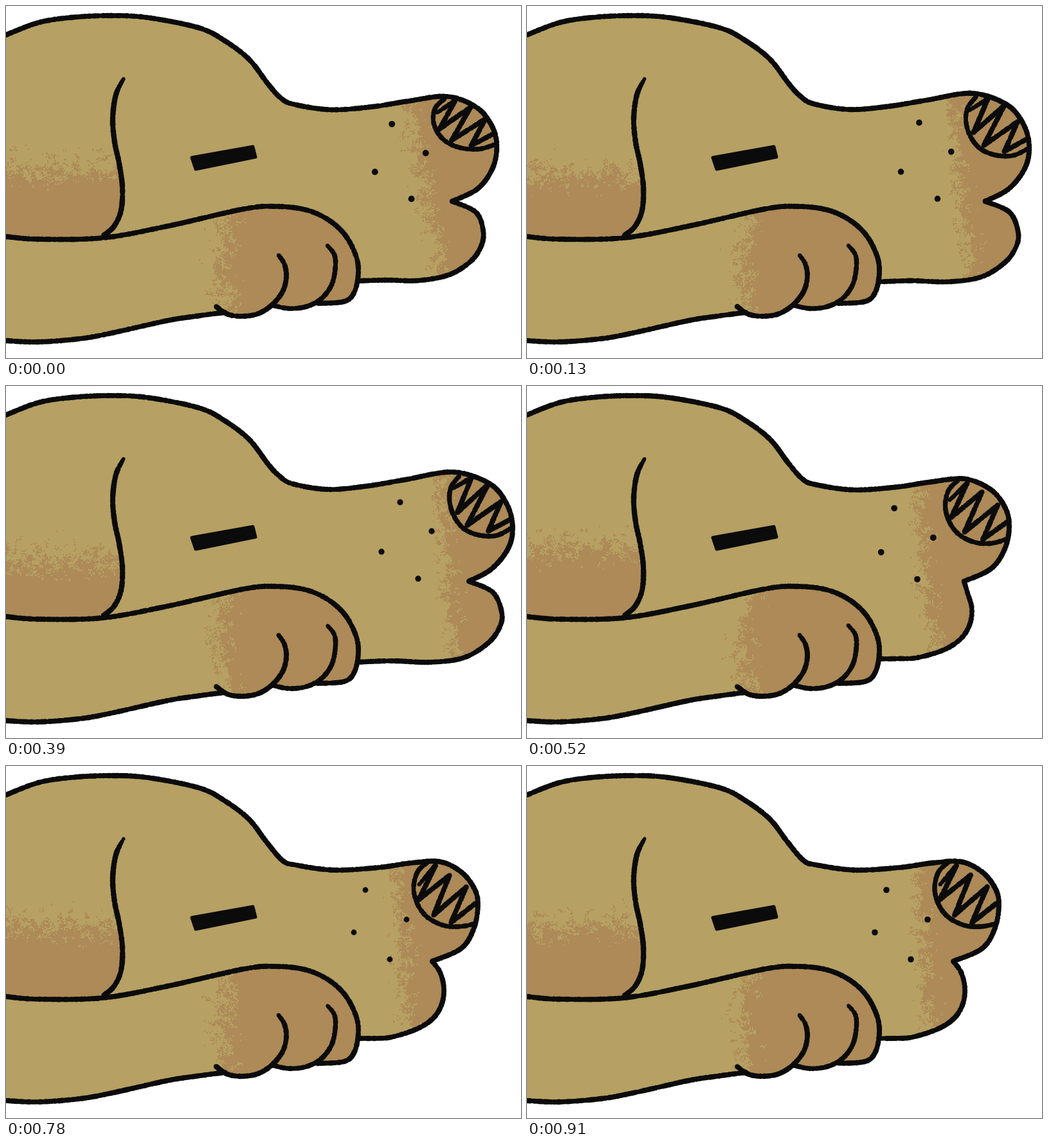
Write an HTML page with a canvas that moves like this. It is 801 by 548 pixels and loops after 1040 ms.

```html
<!DOCTYPE html>
<html lang="en">
<head>
<meta charset="utf-8">
<title>Sleeping dog</title>
<style>
html, body { margin: 0; width: 801px; height: 548px; overflow: hidden; background: #fff; }
canvas { display: block; }
</style>
</head>
<body>
<canvas id="stage" width="801" height="548"></canvas>
<script>
const W = 801, H = 548, STEP = 130;
const FUR = "#b6a063", SHADE = "#ad8a57", INK = "#0b0b0b";

// How far the muzzle is stretched out by each breath step, 0 to 1.
const BREATH = [0.68, 0.92, 1, 1, 0.12, 0, 0, 0];

// Key points that smooth curves run through.
const body = parse({
  back: "0,45 50,26 100,18 160,15 220,18 300,34 340,54 378,83",
  ear: "183,113 171,138 166,175 169,212 176,245 181,282 179,318 168,343 152,357",
  arm: "0,359 50,363 150,361 250,343 370,316 420,312 465,317 500,332 527,356 544,388 548,415 542,445 526,460 485,463",
  toe1: "424,388 433,402 436,422 430,445 413,466 392,479 368,483 345,480 327,468",
  toe2: "500,373 511,388 512,410 506,435 490,456 467,468 440,471 415,466",
  belly: "0,521 50,523 115,518 165,509 250,490 295,483 340,477",
  eye: "289,236 384,219 388,235 295,254"
});
const exhaled = parse({
  top: "405,118 430,147 450,154 510,162 580,158 630,151 675,149 708,165 728,190 734,215 728,252 708,284 663,304",
  jaw: "675,321 681,345 678,370 665,392 640,409 600,422 575,424 545,424",
  nose: "655,150 640,165 634,190 640,215 655,235 680,248 705,250 728,246",
  scribble: "642,185 668,155 642,208 690,170 665,232 716,188 692,244 730,214",
  dots: "559,193 623,239 541,259 597,301"
});
const inhaled = parse({
  top: "408,122 424,139 445,152 500,161 560,156 620,146 695,134 752,152 779,184 788,220 781,253 755,285 720,304",
  jaw: "757,321 771,352 768,375 750,400 712,423 660,430 600,428 545,430",
  nose: "705,140 692,158 690,180 697,203 712,222 735,232 762,233 785,222",
  scribble: "694,160 724,143 702,197 750,153 717,217 770,180 750,226 784,208",
  dots: "613,181 662,226 584,258 641,300"
});

function parse(shapes) {
  return Object.fromEntries(Object.entries(shapes).map(
    ([name, text]) => [name, text.split(" ").map(p => p.split(",").map(Number))]));
}

function stretch(name, t) {
  return exhaled[name].map((p, i) => p.map((v, j) => v + (inhaled[name][i][j] - v) * t));
}

// Catmull-Rom curve sampled about once per pixel.
function smooth(pts) {
  const out = [];
  for (let i = 0; i < pts.length - 1; i++) {
    const b = pts[i], c = pts[i + 1], a = pts[i - 1] || b, d = pts[i + 2] || c;
    const n = Math.ceil(Math.hypot(c[0] - b[0], c[1] - b[1]));
    for (let k = 0; k < n; k++) {
      const t = k / n;
      out.push([0, 1].map(j => b[j] + t / 2 * (c[j] - a[j]
        + t * (2 * a[j] - 5 * b[j] + 4 * c[j] - d[j] + t * (3 * (b[j] - c[j]) + d[j] - a[j])))));
    }
  }
  out.push(pts[pts.length - 1]);
  return out;
}

function hash(x, y, seed) {
  let h = Math.imul(x, 374761393) ^ Math.imul(y, 668265263) ^ Math.imul(seed + 1, 974634773);
  h = Math.imul(h ^ h >>> 13, 1274126177);
  h = Math.imul(h ^ h >>> 15, 2246822519);
  return ((h ^ h >>> 16) >>> 0) / 4294967296;
}

function grain(x, y, seed) {
  const i = Math.floor(x / 7), j = Math.floor(y / 7), u = x / 7 - i, v = y / 7 - j;
  const mix = row => hash(i, row, seed) * (1 - u) + hash(i + 1, row, seed) * u;
  return 0.6 * (mix(j) * (1 - v) + mix(j + 1) * v) + 0.4 * hash(x, y, seed + 50);
}

function polygon(pts) {
  const path = new Path2D();
  pts.forEach(p => path.lineTo(...p));
  path.closePath();
  return path;
}

function render(breath, step) {
  const canvas = document.createElement("canvas");
  canvas.width = W;
  canvas.height = H;
  const g = canvas.getContext("2d");

  const fill = (path, color) => {
    g.fillStyle = color;
    g.fill(path);
  };
  // depth: distance into the shadow, which thins out in grains over the given band
  const shade = (path, [x0, y0, x1, y1], band, depth) => {
    g.save();
    g.clip(path);
    g.fillStyle = SHADE;
    for (let y = y0; y < y1; y += 2) {
      for (let x = x0; x < x1; x += 2) {
        if (depth(x, y) / band / 2 + 0.5 > grain(x, y, step)) g.fillRect(x, y, 2, 2);
      }
    }
    g.restore();
  };
  // Rough pen line; taper is the relative width at its start.
  const ink = (pts, radius, taper = 1) => {
    g.fillStyle = INK;
    g.beginPath();
    pts.forEach(([x, y], i) => {
      const thin = taper + (1 - taper) * Math.min(1, i / 25);
      const r = radius * thin + (hash(i, radius * 10, step) - 0.5) * 0.9;
      g.moveTo(x + r, y);
      g.arc(x, y, r, 0, 7);
    });
    g.fill();
  };

  // The nose lags behind the jaw and is squeezed by a sudden breath in.
  const before = BREATH[(step + BREATH.length - 1) % BREATH.length];
  const lagged = breath + (before - breath) * 0.2;
  const squeeze = 1 - 0.4 * Math.max(0, breath - before) ** 2;
  const tip = name => stretch(name, lagged).map(([x, y]) => [x, 143 + (y - 143) * squeeze]);

  const top = [...body.back, ...stretch("top", lagged)];
  const topLine = smooth(top);
  const jawLine = smooth([top[top.length - 1], ...stretch("jaw", breath)]);
  const ear = smooth(body.ear), arm = smooth(body.arm), belly = smooth(body.belly);

  g.fillStyle = "#fff";
  g.fillRect(0, 0, W, H);

  const head = polygon([...topLine, ...jawLine, [0, 420]]);
  fill(head, FUR);
  const muzzleEdge = y => 605 + (y - 150) * 0.08 + 70 * breath ** Math.max(1, 3 - (y - 150) / 125);
  shade(head, [550, 130, W, 440], 34, (x, y) => x - muzzleEdge(y));
  const earEdge = 248 + 20 * lagged ** 2;
  shade(polygon([...ear, [0, 380], [0, 107]]), [0, 180, 190, 380], 50, (x, y) => y - earEdge);

  ink(topLine, 3.8);
  ink(jawLine, 3.7);
  ink(ear, 4, 0.6);
  ink(smooth(tip("nose")), 3.5);
  const scribble = tip("scribble");
  ink(scribble.slice(1).flatMap((p, i) => smooth([scribble[i], p])), 3.7, 0.7);
  stretch("dots", breath ** 0.7).forEach(dot => ink([dot], 4.6));

  const eye = polygon(body.eye);
  fill(eye, INK);
  g.strokeStyle = INK;
  g.lineWidth = 5;
  g.lineJoin = "round";
  g.stroke(eye);

  const leg = polygon([...arm, ...body.toe2.slice(4), ...body.toe1.slice(4, 8), ...[...belly].reverse()]);
  fill(leg, FUR);
  shade(leg, [240, 300, 560, 490], 42, (x, y) => x - 334 - (y - 400) ** 2 / 500);
  ink(belly, 3.8);
  ink(arm, 3.8);
  ink(smooth(body.toe2), 3.6, 0.8);
  ink(smooth(body.toe1), 3.8, 0.8);
  return canvas;
}

const cels = BREATH.map(render);
const stage = document.getElementById("stage").getContext("2d");

function play() {
  stage.drawImage(cels[Math.floor(performance.now() / STEP) % cels.length], 0, 0);
  requestAnimationFrame(play);
}
play();
</script>
</body>
</html>
```
